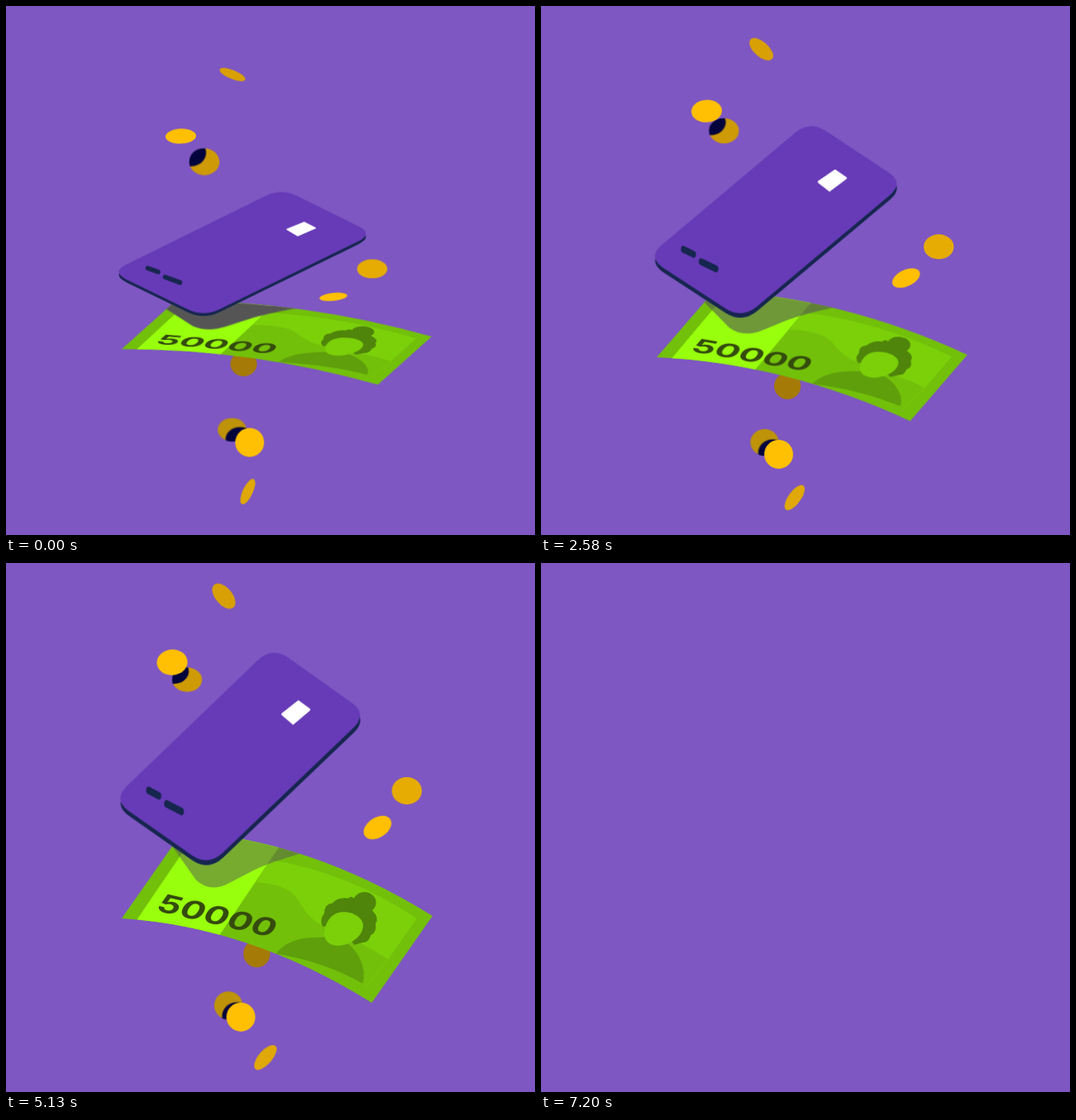
These frames come from a looping animation (640 by 640 pixels, 7230 ms). An HTML page without scripts:

```html
<!DOCTYPE html>
<html lang="en">
<head>
<meta charset="utf-8">
<title>Floating money</title>
<style>
html, body { margin: 0; width: 100%; height: 100%; overflow: hidden; background: #7e57c2; }
svg { display: block; width: 100vw; height: 100vh; }

.scene, .coin, .drift, .bill, .phone, .cast { animation: 7230ms linear infinite; }

/* everything blinks off for the last moment of the loop */
.scene { animation-name: blink; animation-timing-function: step-end; }
@keyframes blink { 0% { opacity: 1 } 99.585%, 100% { opacity: 0 } }

/* coins swing between a resting pose --a and a lifted pose --b */
.coin { animation-name: swing; }
@keyframes swing {
  0%, 48.5% { transform: var(--a); animation-timing-function: cubic-bezier(.28, .58, .5, 1) }
  24.2%, 69.85% { transform: var(--b); animation-timing-function: cubic-bezier(.4, 0, .8, .75) }
  99.58%, 100% { transform: var(--a) }
}

/* the lower ones leave the lifted pose a little sooner */
.low { animation-name: sway; }
@keyframes sway {
  0%, 48.5% { transform: var(--a); animation-timing-function: cubic-bezier(.28, .58, .5, 1) }
  24.2%, 69.85% { transform: var(--b); animation-timing-function: cubic-bezier(.36, .06, .77, .72) }
  99.58%, 100% { transform: var(--a) }
}

/* slow sideways drift, out and back once per loop */
.drift { animation-name: drift; }
@keyframes drift {
  0%, 99.58%, 100% { transform: translate(0px, 0px) }
  12.03% { transform: translate(calc(var(--x) * .35), calc(var(--y) * .35)) }
  35.68% { transform: translate(calc(var(--x) * .73), calc(var(--y) * .73)) }
  48.55% { transform: translate(var(--x), var(--y)) }
  70.95% { transform: translate(calc(var(--x) * .54), calc(var(--y) * .54)) }
  84.65% { transform: translate(calc(var(--x) * .3), calc(var(--y) * .3)) }
}

.phone { animation-name: tilt; transform-origin: 177.5px 319.5px; }
@keyframes tilt {
  0% { transform: translate(0px, 0px) matrix(1, 0, 0, 1, 0, 0); animation-timing-function: cubic-bezier(.17, .62, .4, 1) }
  23.7% { transform: translate(1px, -34.5px) matrix(.985, -.087, .0985, 1.673, 0, 0); animation-timing-function: cubic-bezier(.4, .03, .77, .78) }
  49.8% { transform: translate(0px, 6.5px) matrix(.997, -.0154, .0174, 1.119, 0, 0); animation-timing-function: cubic-bezier(.17, .62, .4, 1) }
  72.6% { transform: translate(1px, -41.2px) matrix(.985, -.0855, .0968, 1.662, 0, 0); animation-timing-function: cubic-bezier(.58, 0, .92, .6) }
  99.58%, 100% { transform: translate(0px, 0px) matrix(1, 0, 0, 1, 0, 0) }
}

.cast { animation-name: fade; }
@keyframes fade {
  0% { opacity: 1; animation-timing-function: cubic-bezier(.17, .62, .4, 1) }
  23.7% { opacity: .48; animation-timing-function: cubic-bezier(.4, .03, .77, .78) }
  49.8% { opacity: .9; animation-timing-function: cubic-bezier(.17, .62, .4, 1) }
  72.6% { opacity: .49; animation-timing-function: cubic-bezier(.58, 0, .92, .6) }
  99.58%, 100% { opacity: 1 }
}

.bill { animation-name: flap; transform-origin: 140px 430px; }
@keyframes flap {
  0% { transform: translateY(-15px) matrix(.998, -.036, .082, .5125, 0, 0); animation-timing-function: cubic-bezier(.2, .6, .5, 1) }
  18% { transform: translateY(0px) matrix(1, 0, -.003, 1.03, 0, 0); animation-timing-function: cubic-bezier(.4, 0, .8, .8) }
  35.68% { transform: translateY(-5px) matrix(1, -.002, .044, .74, 0, 0) }
  48.55% { transform: translateY(-7px) matrix(.999, -.021, .051, .699, 0, 0); animation-timing-function: cubic-bezier(.28, .58, .5, 1) }
  70.95% { transform: translateY(0px) matrix(1, 0, .005, .972, 0, 0); animation-timing-function: cubic-bezier(.4, 0, .8, .8) }
  84.65% { transform: translateY(-5px) matrix(1, -.002, .038, .777, 0, 0) }
  99.58%, 100% { transform: translateY(-15px) matrix(.998, -.036, .082, .5125, 0, 0) }
}

.sum { font: 700 29px Inter, "Open Sans", sans-serif; fill: #344b0d; }
</style>
</head>
<body>
<svg viewBox="0 0 640 640">
<defs>
  <circle id="disc" r="18"/>
  <clipPath id="round"><use href="#disc"/></clipPath>
  <path id="note" d="M140 430Q295 440 442 535L516 427Q369 332 214 322Z"/>
  <clipPath id="inNote"><use href="#note"/></clipPath>
  <path id="slab" d="M146 312.5L314 230Q333 220.7 352 230L426 266.5Q445 275.5 426 285L258 367Q239 376 220 367L146 331Q127 321.5 146 312.5Z"/>
</defs>

<g class="scene">
  <!-- upper coins -->
  <use class="coin" href="#disc" fill="#d9a005" style="--a:translate(274px,83px) rotate(22deg) scale(.92,.3);--b:translate(263.5px,40px) rotate(50deg) scale(1,.57)"/>
  <g class="drift" style="--x:-10.5px;--y:-10.5px">
    <g class="coin" style="--a:translate(240px,188.5px) scale(1.03,.92);--b:translate(224.7px,146.7px) scale(1.02,.84)">
      <g clip-path="url(#round)">
        <use href="#disc" fill="#ce9a06"/>
        <use href="#disc" x="-16" y="-12" fill="#04043c"/>
      </g>
    </g>
    <use class="coin" href="#disc" fill="#ffc003" style="--a:translate(211.5px,157.5px) rotate(-2deg) scale(1.03,.5);--b:translate(206.7px,125.7px) rotate(-4deg) scale(1.03,.86)"/>
  </g>

  <!-- right coins -->
  <g class="drift" style="--x:24px;--y:10.5px">
    <use class="coin" href="#disc" fill="#e6ac04" style="--a:translate(443px,318px) scale(1.02,.64);--b:translate(472px,269.8px) scale(1.01,.92)"/>
  </g>
  <g class="drift" style="--x:21.5px;--y:0px">
    <use class="coin" href="#disc" fill="#ffc003" style="--a:translate(396px,352px) rotate(-6deg) scale(.94,.27);--b:translate(438px,320px) rotate(-33deg) scale(1.02,.67)"/>
  </g>

  <!-- lower coins -->
  <use class="coin low" href="#disc" fill="#a67a06" style="--a:translate(287.5px,433px) scale(.89,.83);--b:translate(303.5px,473px) scale(.9,.92)"/>
  <g class="coin low" style="--a:translate(273.5px,512.5px) scale(.98,.8);--b:translate(269px,535.5px) scale(.97,.96)">
    <g clip-path="url(#round)">
      <use href="#disc" fill="#be9309"/>
      <use href="#disc" x="10" y="14" fill="#04043c"/>
    </g>
  </g>
  <use class="coin low" href="#disc" fill="#ffc003" style="--a:translate(294.8px,528px) scale(.97,.97);--b:translate(284px,549.5px) scale(.97,.97)"/>
  <use class="coin low" href="#disc" fill="#e0a808" style="--a:translate(292.5px,587.5px) rotate(-65deg) scale(.93,.34);--b:translate(314px,598.3px) rotate(-49deg) scale(1.03,.46)"/>

  <!-- banknote -->
  <g class="bill">
    <use href="#note" fill="#72c00a"/>
    <g clip-path="url(#inNote)">
      <path fill="#98ff0d" d="M158 432L234 318L346 318L258 451L250 470L150 450Z"/>
      <path fill="#7bd00a" d="M303 385L320 357Q412 372 497 430L462 481C440 465 400 446 385 440C355 425 360 405 340 394Q325 386 303 385Z"/>
      <path fill="none" stroke="#7bd00a" stroke-width=".8" d="M462 481L435 515"/>
      <path fill="#5f9f0b" d="M325 476Q338 456 368 454L396 453Q415 457 427 478Q436 496 431 511Q385 484 327 474Z"/>
      <path fill="#4f850a" d="M383 440Q379 431 385 424Q385 412 395 411Q402 403 414 405Q418 401 421 405A14 13 0 1 1 443 420Q452 429 447 437Q449 447 441 451Q439 460 431 460L421 463L400 430L386 440Z"/>
      <path fill="#7bd00a" d="M385 449C386 432 396 422 408 422C422 422 432 430 432 439C432 449 421 462 403 464C391 464 385 458 385 449Z"/>
      <text class="sum" transform="matrix(1.46 .35 -.55 1 180.3 420)">50000</text>
      <path class="cast" fill="#555" d="M198 335L230 382Q246 398 268 387L300 370Q320 360 358 349L340 300L200 300Z"/>
    </g>
  </g>

  <!-- phone -->
  <g class="phone">
    <use href="#slab" y="3.6" fill="#16264f"/>
    <use href="#slab" fill="#673ab7"/>
    <path fill="#fff" stroke="#fff" stroke-width="1.5" stroke-linejoin="round" d="M340 270.4L361 262L374.3 268.8L353 278Z"/>
    <path fill="none" stroke="#16264f" stroke-width="5.6" stroke-linecap="round" d="M171.5 317.2L184 321.8M192.5 328L210.5 334.6"/>
  </g>
</g>
</svg>
</body>
</html>
```
